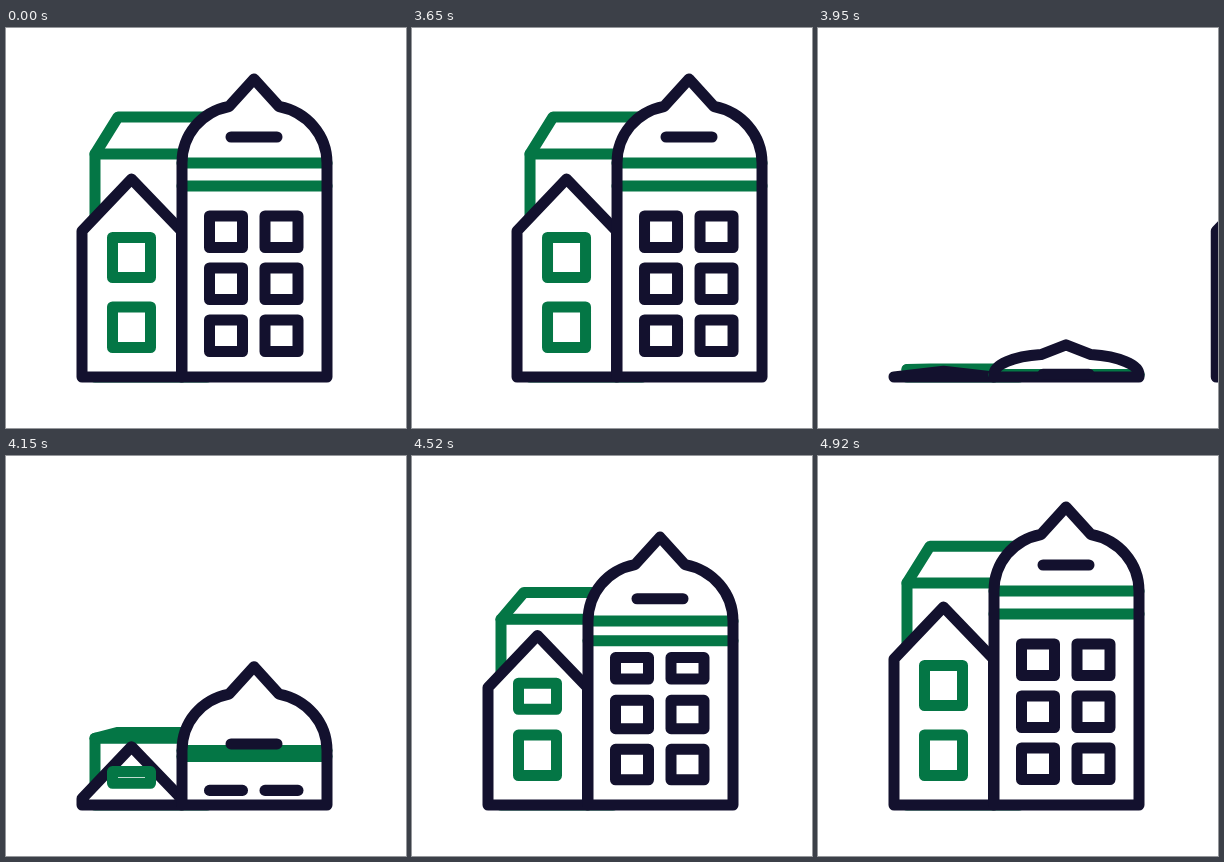
These frames come from a looping animation (400 px wide and 400 px high, 4950 ms). An HTML page with a canvas:

```html
<!DOCTYPE html>
<html lang="en">
<head>
<meta charset="utf-8">
<title>Buildings</title>
<style>
  html, body { margin: 0; width: 100%; height: 100%; overflow: hidden; background: #fff; }
  canvas { display: block; width: 400px; height: 400px; }
</style>
</head>
<body>
<canvas id="stage"></canvas>
<script>
const LOOP = 4950, LEAVE = 3500, GROW = 3900, GROUND = 349;
const NAVY = '#13112e', GREEN = '#047645';
const ROW_STARTS = [4325, 4215, 4150];

const canvas = document.getElementById('stage');
const ctx = canvas.getContext('2d');
const dpr = window.devicePixelRatio || 1;
canvas.width = canvas.height = 400 * dpr;

const clamp = v => Math.min(1, Math.max(0, v));
const span = (t, start, length) => clamp((t - start) / length);
const easeOut = u => 1 - (1 - u) ** 2;

// cubic-bezier(.33, y1, .33, y2)
function rise(u, y1, y2 = 1) {
  let lo = 0, hi = 1;
  for (let i = 0; i < 24; i++) {
    const s = (lo + hi) / 2;
    if (.99 * s * (1 - s) + s ** 3 < u) lo = s; else hi = s;
  }
  const s = hi, r = 1 - s;
  return 3 * r * r * s * y1 + 3 * r * s * s * y2 + s ** 3;
}

function paint(path, color, fill) {
  if (fill) { ctx.fillStyle = '#fff'; ctx.fill(path); }
  ctx.strokeStyle = color;
  ctx.stroke(path);
}

function line(color, points, fill) {
  const path = new Path2D();
  points.forEach(([x, y]) => path.lineTo(x, y));
  if (fill) path.closePath();
  paint(path, color, fill);
}

// Panes stretch upward from just below their sill.
function pane(color, x, top, w, h, t, start) {
  const s = easeOut(span(t, start, 450));
  if (!s) return;
  const path = new Path2D();
  path.rect(x, top + (h + 11) * (1 - s), w, h * s);
  paint(path, color);
}

function backBlock(t) {
  const p = rise(span(t, 3895, 1065), .15, .93);
  const top = GROUND - 260 * p;
  const edge = GROUND - 223 * (p + .1 * p * (1 - p));
  line(GREEN, [[89, GROUND], [89, edge], [112, top], [201, top], [201, GROUND]], true);
  line(GREEN, [[89, edge], [176, edge]]);
}

function house(t) {
  const apex = 198 * rise(span(t, GROW, 1040), .15);
  const eaves = GROUND - apex + Math.min(52, apex);
  line(NAVY, [[76, GROUND], [76, eaves], [125.5, GROUND - apex], [175.5, eaves], [175.5, GROUND]], true);
  pane(GREEN, 106.5, 209.5, 38, 40, t, 4336);
  pane(GREEN, 106.5, 279, 38, 40.5, t, 4080);
}

function tower(t) {
  const lift = rise(span(t, 3910, 990), .05);
  const dome = easeOut(span(t, GROW, 260));
  const wall = GROUND - 214 * lift;
  const y = v => wall - (135 - v) * dome;

  const shell = new Path2D();
  shell.moveTo(176, GROUND);
  shell.lineTo(176, wall);
  shell.bezierCurveTo(176, y(107), 195, y(84), 223, y(78.5));
  shell.lineTo(248, y(51));
  shell.lineTo(273, y(78.5));
  shell.bezierCurveTo(301, y(84), 321, y(107), 321, wall);
  shell.lineTo(321, GROUND);
  shell.closePath();
  ctx.fillStyle = '#fff';
  ctx.fill(shell);

  for (const h of [214, 191]) {
    const level = GROUND - h * lift;
    line(GREEN, [[176, level], [321, level]]);
  }
  paint(shell, NAVY);
  const dash = GROUND - 240 * lift;
  line(NAVY, [[225, dash], [271, dash]]);

  ROW_STARTS.forEach((start, row) => {
    for (const x of [203.5, 259]) pane(NAVY, x, 188 + 52 * row, 33, 31.5, t, start);
  });
}

function buildings(t, dx) {
  ctx.save();
  ctx.translate(dx, 0);
  backBlock(t);
  house(t);
  tower(t);
  ctx.restore();
}

function render(now) {
  const t = now % LOOP;
  ctx.setTransform(dpr, 0, 0, dpr, 0, 0);
  ctx.clearRect(0, 0, 400, 400);
  ctx.lineWidth = 11;
  ctx.lineJoin = ctx.lineCap = 'round';

  if (t >= GROW) buildings(t, 0);
  const dx = 88 * (Math.max(0, t - LEAVE) / 250) ** 2.2;
  if (dx < 340) buildings(2 * LOOP, t >= 3520 ? Math.max(1, dx) : 0);
}

const began = performance.now();
function tick() {
  render(performance.now() - began);
  requestAnimationFrame(tick);
}
tick();
</script>
</body>
</html>
```
